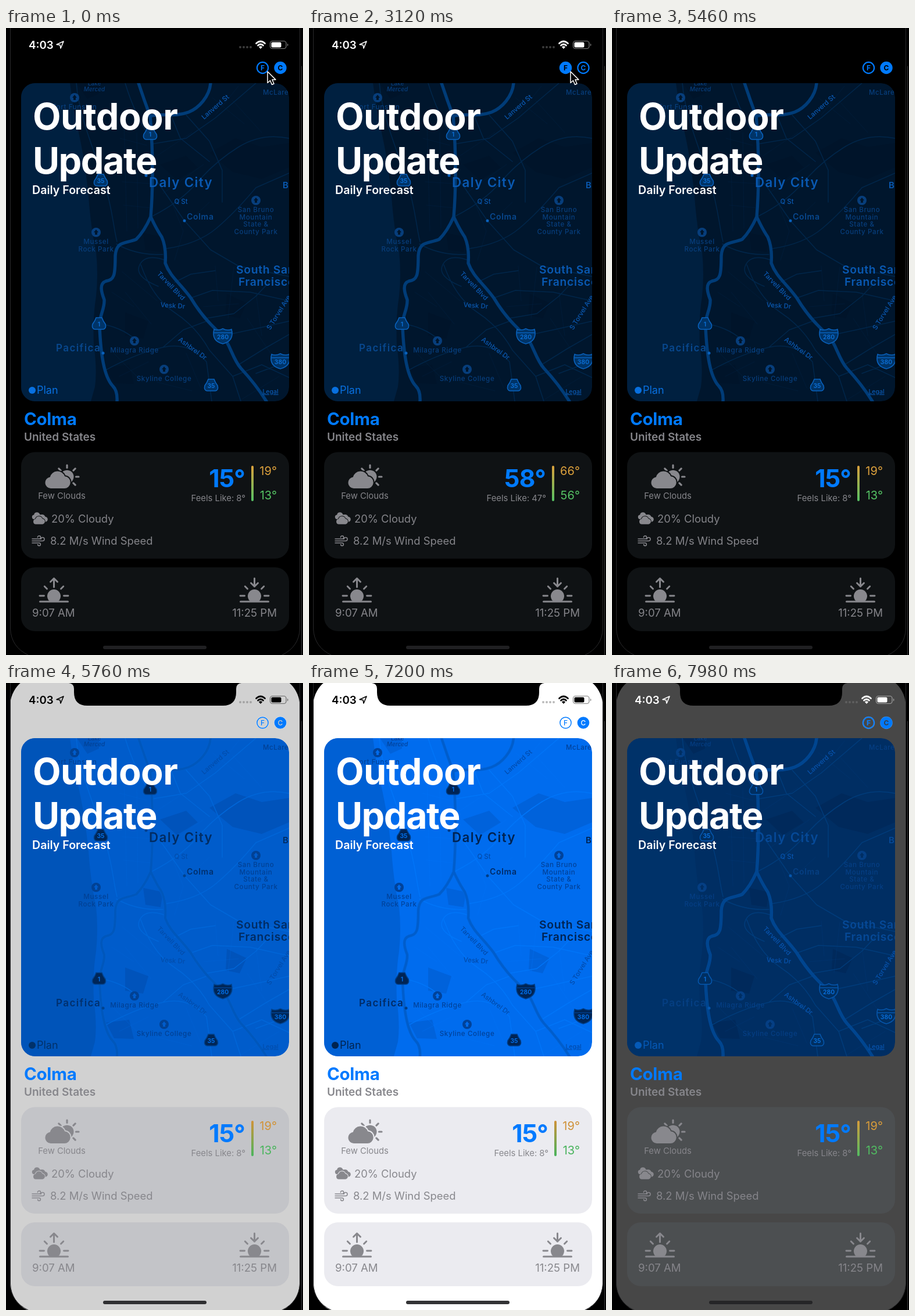
An HTML page that plays this animation: 511 px wide and 1080 px high, repeating every 8000 ms.

```html
<!DOCTYPE html>
<html lang="en">
<head>
<meta charset="utf-8">
<title>Forecast app</title>
<style>
html, body { margin: 0; width: 100%; height: 100%; overflow: hidden; background: #000; }
svg { display: block; width: 100%; height: 100%; font-family: Inter, Roboto, sans-serif; }
</style>
</head>
<body>
<svg id="stage" viewBox="0 0 511 1080" preserveAspectRatio="none"></svg>
<script>
const LOOP = 8000;
const CLICKS = [1710, 4200];
const BLUE = '#007aff';
const themes = {
  dark: {
    bg: '#000', card: '#0f1214', gray: '#85858a', icon: '#88888d', home: '#202022',
    land: '#00162d', water: '#002040', park: '#00142a', minor: '#00264a', road: '#003c78', edge: '#003c78',
    city: '#0959b2', town: '#08488e', poi: '#073e7c', street: '#0a58b0', brand: '#0870e0',
    shield: '#003468', shieldEdge: '#0961bc', shieldText: '#0b70d8', dot: '#0961bc',
    hi: '#dca13c', lo: '#55c264', onBlue: '#000', ring: 2.2, letter: 700
  },
  light: {
    bg: '#fff', card: '#ebebf0', gray: '#88888d', icon: '#88888d', home: '#333335',
    land: '#006cee', water: '#0060d4', park: '#0062db', minor: '#0075f8', road: '#005dcc', edge: '#0068e0',
    city: '#002352', town: '#002b66', poi: '#00429a', street: '#004bab', brand: '#002450',
    shield: '#002454', shieldEdge: '#003d86', shieldText: '#0074f4', dot: '#003d86',
    hi: '#cf9138', lo: '#48b35c', onBlue: '#fff', ring: 1.5, letter: 500
  }
};

const text = (x, y, s, size, fill, weight = 400, attrs = '') =>
  `<text x="${x}" y="${y}" font-size="${size}" fill="${fill}" font-weight="${weight}" ${attrs}>${s}</text>`;
const mid = 'text-anchor="middle" ';
const end = 'text-anchor="end" ';
const line = (d, color, width, attrs = '') =>
  `<path d="${d}" fill="none" stroke="${color}" stroke-width="${width}" stroke-linecap="round" stroke-linejoin="round" ${attrs}/>`;
const fill = (d, color, attrs = '') => `<path d="${d}" fill="${color}" ${attrs}/>`;
const circle = (x, y, r, color, attrs = '') => `<circle cx="${x}" cy="${y}" r="${r}" fill="${color}" ${attrs}/>`;
const card = (y, h, color) => `<rect x="26" y="${y}" width="461" height="${h}" rx="24" fill="${color}"/>`;

const COAST = 'M26 95H110Q116 140 126 185T142 290Q146 345 155 385Q159 425 155 462Q149 500 151 545Q157 590 153 618L146 643H26Z';
const ROADS = 'M248 150Q252 200 252 245T249 325Q238 350 224 364C205 372 190 366 188 392C188 428 186 433 172 436C160 440 164 455 169 468C170 485 160 495 161 515C163 560 168 600 184 617Q192 625 191 643' +
  'M249 325Q258 345 268 360Q276 378 274 405C282 428 300 440 318 465Q340 502 373 530C386 546 390 570 404 586Q430 614 448 643' +
  'M352 95C350 118 332 138 314 145C290 154 266 146 248 152Q238 125 228 95';
const MINOR = 'M121 95C126 155 152 210 168 262S184 340 191 368M205 95Q222 150 246 186M250 250L278 290L307 332L352 382L400 410L487 428' +
  'M250 325Q300 300 330 265T400 205T487 190M276 380Q330 372 362 345T430 275L487 250M190 372Q225 392 270 390M274 400Q240 388 230 408T262 445' +
  'M232 408Q252 465 290 490T350 555L390 600L404 643M290 438L318 424L360 418M318 465L355 452L420 455L487 470M345 500L392 492L430 462L460 430' +
  'M373 530L420 520L487 505M400 580L445 552L487 528M430 595L462 583L487 572M170 590Q225 560 270 550T345 575L354 643M160 509Q198 515 222 536' +
  'M310 150L350 195L372 245L372 300M250 200L310 190L360 155L430 95M285 153L300 190L350 230M390 600L440 580L487 602M270 550L305 520L345 505';
const STREETS = 'M196 190L242 202M193 225L250 232M200 265L250 268M202 305L250 310M203 160L208 350M225 180L227 345M260 220L320 180M270 285L340 235M285 300L305 350L290 400' +
  'M318 330L350 300M360 410L365 470M392 412L382 500M430 455L440 530M340 480L400 475M415 500L455 560M200 420L260 470M205 455L250 510M182 455L220 480' +
  'M185 560L235 610M195 600L245 575M260 610L320 625M310 560L335 620M405 640L470 600M355 120L410 165M390 125L440 180M400 100L360 150';
const PARKS = 'M380 458L414 474L402 500L378 495ZM236 353L270 360L266 386L240 382ZM350 215L395 190L440 205L487 198V240L440 260L390 248ZM265 235L310 220L330 240L294 262Z' +
  'M205 490L245 505L236 535L205 530ZM172 585L212 580L220 613L186 612ZM122 95H160V113L140 122Z';

function shield(x, y, s, c, interstate) {
  const d = interstate
    ? 'M-15-11Q-8-8 0-12Q8-8 15-11Q20 9 0 14Q-20 9-15-11Z'
    : 'M-5-10H5Q7-4 11 1Q13 9 7 10H-7Q-13 9-11 1Q-7-4-5-10Z';
  return `<g transform="translate(${x} ${y})">${fill(d, c.shield, `stroke="${c.shieldEdge}" stroke-width="1.6"`)}` +
    (interstate ? line('M-15-5H15', c.shieldEdge, 1.5) : '') +
    text(0, interstate ? 6 : 5, s, 10.5, c.shieldText, 600, mid) + '</g>';
}

function poi(x, y, lines, c) {
  return circle(x, y, 8, c.poi) + fill(`M${x} ${y - 5}l4 5h-2v4h-4v-4h-2z`, c.land) +
    lines.map((s, i) => text(x, y + 20 + i * 12.7, s, 11.6, c.poi, 500, mid + 'letter-spacing=".6"')).join('');
}

const street = (x, y, angle, s, c) =>
  text(0, 4, s, 11.4, c.street, 500, `${mid}transform="translate(${x} ${y}) rotate(${angle})"`);

function map(c) {
  const spaced = n => `letter-spacing="${n}"`;
  return `<g clip-path="url(#mapClip)">` + card(95, 548, c.land) +
    fill(PARKS, c.park) + line(STREETS, c.minor, .7, 'opacity=".55"') + line(MINOR, c.minor, 1.5) + fill(COAST, c.water) +
    line(ROADS, c.edge, 5.4) + line(ROADS, c.road, 4) +
    text(152, 99, 'Lake', 10, c.poi, 500, mid) + text(152, 109, 'Merced', 10, c.poi, 500, mid + 'font-style="italic"') +
    poi(118, 120, ['Fort Funston'], c) + poi(155, 352, ['Mussel', 'Rock Park'], c) +
    poi(430, 297, ['San Bruno', 'Mountain', 'State &amp;', 'County Park'], c) +
    poi(221, 539, ['Milagra Ridge'], c) + poi(272, 588, ['Skyline College'], c) +
    text(442, 115, 'McLaren', 11.5, c.poi, 500, spaced(.5)) +
    text(246, 274, 'Daly City', 22.3, c.city, 600, spaced(1.4)) +
    text(476, 276, 'Brisbane', 15, c.city, 600) +
    text(311, 330, 'Colma', 14, c.town, 600, spaced(.7)) +
    text(396, 423, 'South San', 19.3, c.city, 600, spaced(.7)) +
    text(400, 444, 'Francisco', 19.3, c.city, 600, spaced(.7)) +
    text(86, 557, 'Pacifica', 17, c.town, 600, spaced(1.4)) +
    [[241, 254], [307, 332], [167, 560]].map(p => circle(...p, 2.5, c.dot)).join('') +
    street(360, 136, -41, 'Lanverd St', c) + street(301, 299, 0, 'Q St', c) +
    street(284, 444, 46, 'Tarvell Blvd', c) + street(287, 478, 4, 'Vesk Dr', c) +
    street(321, 552, 36, 'Ashbrel Dr', c) + street(469, 490, -58, 'S Torvel Ave', c) +
    shield(248, 182, 1, c) + shield(160, 509, 1, c) + shield(163, 262, 35, c) + shield(353, 615, 35, c) +
    shield(373, 530, 280, c, true) + shield(472, 573, 380, c, true) +
    circle(45, 624, 6, c.brand) + text(53, 630, 'Plan', 18, c.brand) +
    text(455, 630, 'Legal', 10.5, c.street, 500, mid + 'text-decoration="underline"') + '</g>';
}

const rays = (x, y, near, far, angles) => angles.map(a => {
  const u = Math.cos(a * Math.PI / 180), v = Math.sin(a * Math.PI / 180);
  return `M${x + u * near} ${y + v * near}L${x + u * far} ${y + v * far}`;
}).join('');

const CLOUD = 'M77 793a9.8 9.8 0 0 1-1.2-19.5a13.2 13.2 0 0 1 25.3-1.2a10.3 10.3 0 0 1-1.4 20.7z';

function horizon(x, c, down) {
  const arrow = down ? `M${x} 948v14m-6-6l6 6l6-6` : `M${x} 963v-15m-6 6l6-6l6 6`;
  return fill(`M${x - 6.5} 988A11.5 11.5 0 1 1 ${x + 6.5} 988Z`, c.icon) +
    line(rays(x, 978, 17, 24.5, [0, 180]) + rays(x, 978, 17, 23, [-45, -135]), c.icon, 2.9) +
    line(`M${x - 24} 988H${x + 24}` + arrow, c.icon, 3);
}

function weatherIcons(c) {
  return line(rays(105, 773, 15.5, 20, [-90, -45, 0, 45, -135]), c.icon, 3.2) +
    circle(105, 773, 11.5, c.icon) + fill(CLOUD, c.icon, `stroke="${c.card}" stroke-width="4" paint-order="stroke"`) +
    `<g transform="translate(25 529) scale(.4)">${fill(CLOUD, c.icon, 'transform="translate(-18 0)"')}</g>` +
    fill(CLOUD, c.icon, 'transform="translate(23 502) scale(.44)"') +
    fill(CLOUD, c.icon, `transform="translate(16 490) scale(.46)" stroke="${c.card}" stroke-width="4" paint-order="stroke"`) +
    line('M45 880H57a2.6 2.6 0 1 0-2.6-2.6M45 883.5H63a3 3 0 1 0-3-3M45 887H57a2.4 2.4 0 1 1-2.4 2.4', c.icon, 1.5);
}

function unitButton(x, letter, c) {
  return `<g data-unit="${letter}">` + circle(x, 68.5, 9.6, 'none', `stroke="${BLUE}" stroke-width="${c.ring}"`) +
    text(x, 73, letter, 12, BLUE, c.letter, mid) + '</g>';
}

function screen(name) {
  const c = themes[name];
  return `<g id="${name}"><rect x="7" y="-14" width="498.500" height="1100" rx="54" fill="${c.bg}"/>` +
    (name === 'light' ? fill('M108 0Q117 1 117 10V16Q117 39 140 39H373Q396 39 396 16V10Q396 1 405 0Z', '#000') : '') +
    `<g class="units">${unitButton(441.5, 'F', c)}${unitButton(472, 'C', c)}</g>` +
    map(c) +
    text(46, 175, 'Outdoor', 63, '#fff', 700, 'letter-spacing="-.5"') +
    text(46, 251, 'Update', 63, '#fff', 700, 'letter-spacing="-1.500"') +
    text(45, 286, 'Daily Forecast', 19.6, '#fff', 600) +
    text(31, 684, 'Colma', 29.5, BLUE, 700, 'letter-spacing="-.3"') +
    text(31, 711, 'United States', 19, c.gray, 600) +
    card(730.5, 183.5, c.card) + card(929, 110, c.card) + weatherIcons(c) +
    text(96, 811, 'Few Clouds', 14.8, c.gray, 400, mid) +
    text(78, 852, '20% Cloudy', 18.4, c.gray) +
    text(76, 890, '8.2 M/s Wind Speed', 18.4, c.gray) +
    `<g class="now">${text(411, 791, '', 42.5, BLUE, 700, end + 'class="temp" letter-spacing="-.8"')}` +
    text(412, 815, '', 14.8, c.gray, 400, end + 'class="feels"') +
    `<rect x="422" y="754" width="4" height="61" rx="2" fill="url(#${name}Range)"/></g>` +
    text(466, 770, '', 20, c.hi, 400, end + 'class="high"') +
    text(466, 812, '', 20, c.lo, 400, end + 'class="low"') +
    horizon(82.5, c) + horizon(427.5, c, true) +
    text(45, 1014, '9:07 AM', 18.6, c.gray) + text(466, 1014, '11:25 PM', 18.6, c.gray, 400, end) +
    `<rect x="167" y="1064" width="178" height="6" rx="3" fill="${c.home}"/></g>`;
}

const range = name => `<linearGradient id="${name}Range" x2="0" y2="1"><stop stop-color="${themes[name].hi}"/>` +
  `<stop offset="1" stop-color="${themes[name].lo}"/></linearGradient>`;

const statusBar = '<g id="status">' + text(39, 36, '4:03', 18.7, 'currentColor', 600) +
  line('M99 23L87 28.500L93 29.300L94 35Z', 'currentColor', 1.6) +
  [403, 409, 415, 421].map(x => circle(x, 33, 2, '#777', 'opacity=".5"')).join('') +
  line('M430.500 26.500Q438 19.500 445.500 26.500M433.500 30Q438 26 442.500 30', 'currentColor', 2.7) +
  fill('M434.800 32.500Q438 30 441.200 32.500L438 36Z', 'currentColor') +
  '<rect x="454.500" y="22.500" width="27.500" height="13" rx="4" fill="none" stroke="currentColor" stroke-opacity=".5" stroke-width="1.2"/>' +
  '<rect x="456.500" y="24.500" width="17" height="9" rx="2" fill="currentColor"/>' +
  fill('M484 26.500Q487 29 484 31.500Z', 'currentColor', 'opacity=".5"') + '</g>';

const stage = document.getElementById('stage');
stage.innerHTML = `<defs><clipPath id="mapClip">${card(95, 548, '#000')}</clipPath>${range('dark')}${range('light')}</defs>` +
  '<rect width="511" height="1080" fill="#000"/>' + screen('dark') + screen('light') + statusBar +
  line('M7.500 0V1035Q9 1066 38 1080M505.500 0V1035Q504 1066 475 1080', '#29292b', 1) +
  line('M508.500 66V1080', '#38383a', 1) +
  circle(450, 77, 25, '#aaa', 'id="press" fill-opacity=".95"') +
  fill('M450 75V94.500L454.500 90.500L457.500 97.500L461 96L458 89H464Z', '#000', 'id="cursor" stroke="#fff" stroke-width="1.5" stroke-linejoin="round"');

const byId = id => document.getElementById(id);
const each = (selector, fn) => stage.querySelectorAll(selector).forEach(fn);
const setText = (cls, s) => each('.' + cls, e => { e.textContent = s; });
const ease = (t, start, length) => {
  const p = Math.min(1, Math.max(0, (t - start) / length));
  return p * p * (3 - 2 * p);
};
const readings = { C: [15, 8, 19, 13], F: [58, 47, 66, 56] };
let shownUnit = '';

function setUnit(unit) {
  if (unit === shownUnit) return;
  shownUnit = unit;
  const [temp, feels, high, low] = readings[unit];
  setText('temp', temp + '°');
  setText('feels', `Feels Like: ${feels}°`);
  setText('high', high + '°');
  setText('low', low + '°');
  each('.now', e => e.setAttribute('transform', `translate(${unit === 'F' ? -4 : 0} 0)`));
  for (const name in themes) {
    each(`#${name} [data-unit]`, e => {
      const on = e.dataset.unit === unit;
      e.firstChild.setAttribute('fill', on ? BLUE : 'none');
      e.lastChild.setAttribute('fill', on ? themes[name].onBlue : BLUE);
    });
  }
}

function buttonOpacity(t) {
  const release = CLICKS.find(c => t >= c - 150 && t < c + 330);
  return release === undefined ? 1 : .2 + .8 * ease(t, release + 30, 300);
}

function render(t) {
  setUnit(t >= CLICKS[0] && t < CLICKS[1] ? 'F' : 'C');
  each('.units', e => e.setAttribute('opacity', buttonOpacity(t)));
  byId('press').setAttribute('visibility', CLICKS.some(c => t >= c - 150 && t < c + 90) ? 'visible' : 'hidden');
  byId('cursor').setAttribute('visibility', t < 5400 ? 'visible' : 'hidden');
  byId('light').setAttribute('opacity', ease(t, 5470, 400) - ease(t, 7720, 400));
  const lightStatus = t >= 5440 && t < 7720;
  byId('status').setAttribute('color', lightStatus ? '#000' : '#fff');
  byId('status').setAttribute('visibility', lightStatus && t < 5480 ? 'hidden' : 'visible');
}

const began = performance.now();
function tick() {
  render((performance.now() - began) % LOOP);
  requestAnimationFrame(tick);
}
tick();
</script>
</body>
</html>
```
